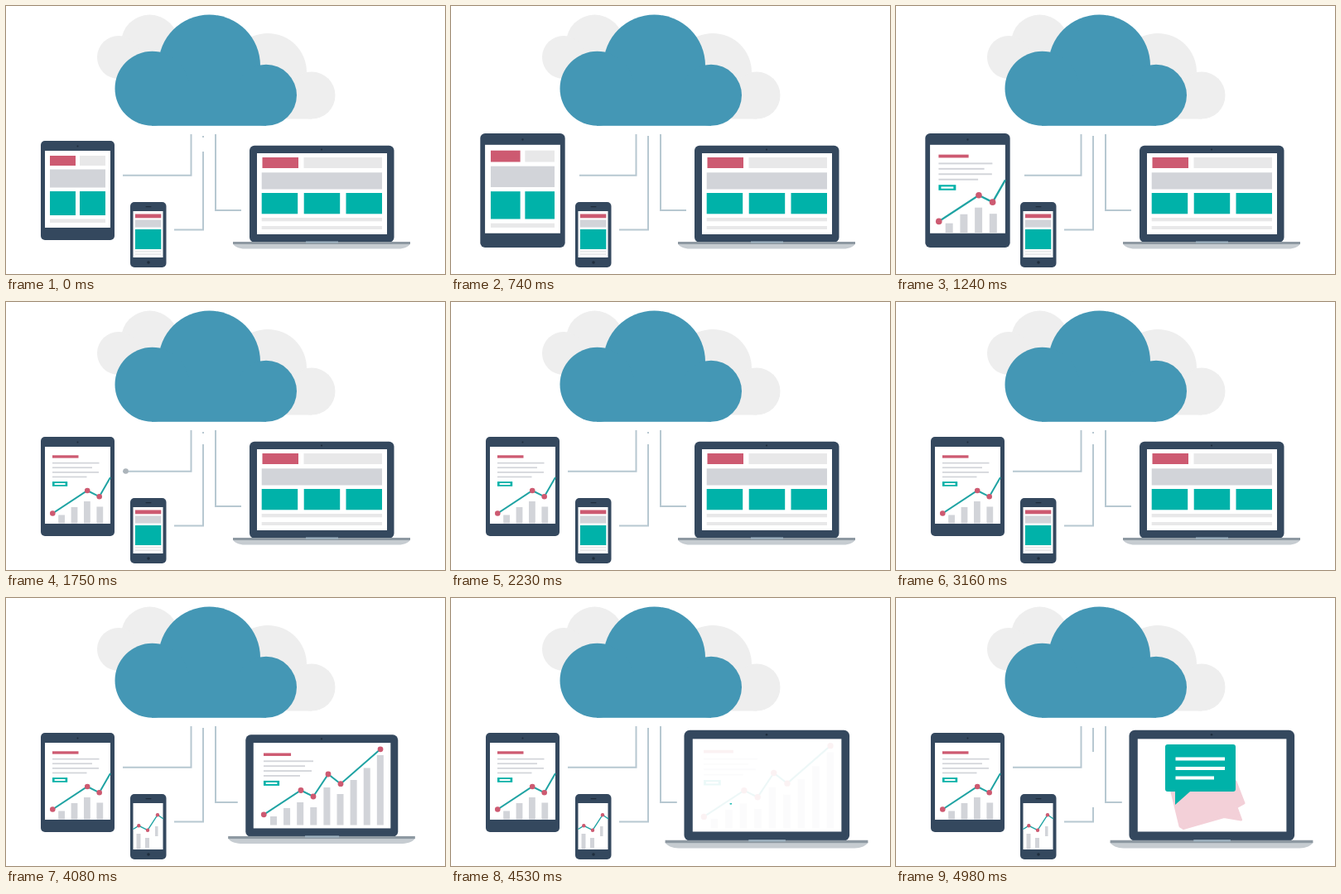
An HTML page for the animation above (5.01 s loop, 530 by 324 pixels).

```html
<!DOCTYPE html>
<html lang="en">
<head>
<meta charset="utf-8">
<title>Cloud sync</title>
<style>
html, body { margin: 0; width: 100%; height: 100%; overflow: hidden; background: #fff; }
svg { display: block; width: 530px; height: 324px; }
.body { fill: #34485e; }
.screen { fill: #fff; }
.red { fill: #cd5a71; }
.teal { fill: #00b2a9; }
.mid { fill: #d2d4d9; }
.pale { fill: #e8e8e9; }
.white { fill: #fff; }
.lens { fill: #1f2d3d; }
.curve { fill: none; stroke: #1fa3a3; stroke-width: 2.1; }
.wire { fill: none; stroke: #b7c8d1; stroke-width: 2; }
.pulse { fill: none; stroke: #acb4ba; stroke-width: 6.4; stroke-linecap: round; stroke-linejoin: round; }
</style>
</head>
<body>
<svg viewBox="0 0 530 324">
  <g id="wires">
    <path id="wireTablet" class="wire"/>
    <path id="wirePhone" class="wire" d="M238 157V270.5H203"/>
    <path id="wireLaptop" class="wire"/>
  </g>
  <path id="dotTablet" class="pulse" d="M144.5 204.5H223.5V156"/>
  <path id="dotPhone" class="pulse" d="M238 156V270.5H206"/>
  <path id="dotLaptop" class="pulse" d="M253 155V247H281"/>

  <g id="cloud">
    <g fill="#eee">
      <circle cx="173.500" cy="45" r="34.500"/>
      <circle cx="136" cy="62" r="26"/>
      <circle cx="316" cy="80" r="47"/>
      <circle cx="369" cy="108" r="28.500"/>
      <rect x="316" y="92" width="53" height="44.500"/>
    </g>
    <g fill="#4497b5">
      <circle cx="245.500" cy="72" r="61.500"/>
      <circle cx="176.500" cy="99.800" r="45"/>
      <circle cx="314" cy="107.800" r="37"/>
      <rect x="176" y="90" width="138" height="54.800"/>
    </g>
  </g>

  <g id="tablet">
    <rect class="body" x="42" y="163" width="89" height="120" rx="5"/>
    <rect class="screen" x="47" y="175" width="79" height="93"/>
    <circle class="lens" cx="86.500" cy="169.500" r="1"/>
    <g id="tabletWeb"></g>
    <g id="tabletChart"></g>
  </g>

  <g id="phone">
    <rect class="body" x="150" y="237" width="43.500" height="79" rx="5"/>
    <rect class="screen" x="153.500" y="248" width="36" height="56"/>
    <rect class="lens" x="168.500" y="242" width="7" height="1.200" rx=".6"/>
    <circle class="lens" cx="172" cy="310" r="1.800"/>
    <g id="phoneWeb"></g>
    <g id="phoneChart"></g>
  </g>

  <g id="laptop">
    <path d="M274 287H488C487 291 480 293.500 474 293.500H288C282 293.500 275 291 274 287Z" fill="#c6ccd1"/>
    <rect class="body" x="294" y="168.700" width="174.500" height="117" rx="6"/>
    <rect x="274" y="285" width="214" height="3" fill="#8e99a2"/>
    <rect x="362" y="284.500" width="39" height="2" fill="#9fb3c1"/>
    <rect class="screen" x="303" y="178" width="157" height="98"/>
    <circle class="lens" cx="381" cy="173.500" r="1.100"/>
    <g id="laptopWeb"></g>
    <g id="laptopChart"></g>
    <g id="chat">
      <path id="bubbleBack" fill="#f3d0d8" stroke="#f3d0d8" stroke-width="3" stroke-linejoin="round"
        d="M330 222L410 222L420 248L411 253L416.500 268L396 264.500L347 278.500L343 276Z"/>
      <g id="bubbleFront">
        <path class="teal" d="M328 177H407Q410 177 410 180V231Q410 234 407 234H355L337 250V234H328Q325 234 325 231V180Q325 177 328 177Z"/>
        <g class="white">
          <rect x="337.500" y="192.500" width="59.500" height="4"/>
          <rect x="337.500" y="204" width="59.500" height="4"/>
          <rect x="337.500" y="215.500" width="46.500" height="4"/>
        </g>
      </g>
    </g>
  </g>
</svg>
<script>
const LOOP = 5010;
const $ = id => document.getElementById(id);

// Shape helpers; boxes are given by their edges.
const box = (c, x1, y1, x2, y2) =>
  `<rect class="${c}" x="${x1}" y="${y1}" width="${x2 - x1}" height="${y2 - y1}"/>`;
const bars = (x, step, w, bottom, tops) =>
  tops.map((top, i) => box('mid', x + i * step, top, x + i * step + w, bottom)).join('');
const curve = (points, dots, r, width) =>
  `<polyline class="curve" style="stroke-width:${width}" points="${points.join(' ')}"/>` +
  dots.map(i => `<circle class="red" cx="${points[i][0]}" cy="${points[i][1]}" r="${r}"/>`).join('');
const article = (x, y, k, widths) =>
  box('red', x, y, x + 31.5 * k, y + 3.3 * k) +
  widths.map((w, i) => box('mid', x, y + (8.5 + 5.6 * i) * k, x + w, y + (10.2 + 5.6 * i) * k)).join('') +
  box('teal', x, y + 31.8 * k, x + 18.2 * k, y + 37.5 * k) +
  box('white', x + 2.6 * k, y + 33.7 * k, x + 15.6 * k, y + 35.7 * k);

$('tabletWeb').innerHTML =
  box('red', 53, 181, 84, 193) + box('pale', 89, 181, 120, 193) +
  box('mid', 53, 197.5, 120, 219.5) +
  box('teal', 53, 224, 84, 253) + box('teal', 89, 224, 120, 253) +
  box('pale', 53, 257.5, 120, 262);

$('tabletChart').innerHTML =
  article(56, 185.3, 1, [56.5, 48, 56, 41.5]) +
  bars(63.2, 15.4, 7.8, 267.5, [257.5, 248, 241, 247.5]) +
  curve([[56.3, 255.5], [98.2, 228], [112.7, 235.3], [126, 212]], [0, 1, 2], 3.3, 2);

$('phoneWeb').innerHTML =
  box('red', 156, 251.5, 187.3, 256.3) + box('mid', 156, 258.5, 187.3, 267.5) +
  box('teal', 156, 270, 187.3, 294) +
  box('pale', 156, 295.7, 187.3, 297.7) + box('pale', 156, 299.2, 187.3, 301);

$('phoneChart').innerHTML =
  box('mid', 157.5, 285, 162.5, 303.5) + box('mid', 168, 290, 173, 302) + box('mid', 180, 276, 183.5, 288) +
  curve([[153.5, 279.5], [160.3, 275.3], [171, 280.7], [183, 262.2], [190, 267]], [0, 1, 2, 3].slice(1), 2.2, 1.4);

$('laptopWeb').innerHTML =
  box('red', 309.5, 183, 353, 196) + box('pale', 359.5, 183, 454, 196) +
  box('mid', 308.7, 201.3, 454, 221.5) +
  [308.7, 359.7, 410.5].map(x => box('teal', x, 226, x + 43.5, 251.3)).join('') +
  box('pale', 308.7, 256, 454, 260.3) + box('pale', 308.7, 266, 454, 270);

$('laptopChart').innerHTML =
  article(311, 187.5, 1.05, [60, 50, 58, 44]) +
  bars(319, 16.1, 8, 274.5, [264, 254, 247, 253, 229, 237, 220, 205.5, 190]) +
  curve([[311.3, 261.8], [356, 232.5], [371, 240], [389, 213], [404, 224.7], [452, 182.8]], [0, 1, 2, 3, 4, 5], 3.4, 2);

// Timing helpers.
const clamp = u => Math.min(1, Math.max(0, u));
const ease = u => u < .5 ? 2 * u * u : 1 - 2 * (1 - u) * (1 - u);
const ramp = (t, a, b) => ease(clamp((t - a) / (b - a)));
function track(keys, t) {
  let v = keys[0][1];
  for (let i = 1; i < keys.length; i++)
    v += (keys[i][1] - keys[i - 1][1]) * ramp(t, keys[i - 1][0], keys[i][0]);
  return v;
}
function scale(id, s, x, y) {
  $(id).setAttribute('transform', `translate(${x} ${y}) scale(${s}) translate(${-x} ${-y})`);
}
const fade = (id, v) => { $(id).style.opacity = v; };

const tabletSize = [[500, 1], [740, 1.15], [1250, 1.15], [1340, 1.19], [1640, 1]];
const cloudSize = [[2230, 1], [2420, 1.15], [2630, 1]];
const laptopSize = [[3920, 1], [4320, 1.168], [4400, 1.144]];
// Broken stretch of the phone wire: start time, solid part, gap.
const gaps = [[0, 2, 17], [560, 0, 0], [1690, 2, 13], [2650, 20, 13], [2770, 2, 13], [3340, 0, 0], [4950, 29, 67]];
const dots = [['dotTablet', 1740, 2230], ['dotPhone', 2598, 3100], ['dotLaptop', 2615, 3115]]
  .map(([id, from, to]) => ({ el: $(id), from, to, len: $(id).getTotalLength() }));

scale('laptopChart', 1 / 1.054, 381, 231);
scale('chat', 1 / 1.144, 381, 231);

function draw(t) {
  const tab = track(tabletSize, t), lap = track(laptopSize, t);
  scale('tablet', tab, 86.5, 223);
  scale('cloud', track(cloudSize, t), 254, 78);
  scale('laptop', lap, 381, 231);

  $('wireTablet').setAttribute('d', `M223.5 155V204.800H${141 + (tab - 1) * 93}`);
  $('wireLaptop').setAttribute('d', `M253 155V247H${284 - (lap - 1) * 78}`);
  const gap = gaps.filter(g => t >= g[0]).pop();
  $('wirePhone').setAttribute('stroke-dasharray', gap[2] ? `${gap[1]} ${gap[2]} 400` : 'none');

  for (const d of dots) {
    const head = d.len * ramp(t, d.from, d.to);
    const tail = d.len * ramp(t - 60, d.from, d.to);
    d.el.style.display = t >= d.from && t < d.to ? '' : 'none';
    d.el.setAttribute('stroke-dasharray', `${Math.max(.1, Math.min(9, head - tail))} 999`);
    d.el.setAttribute('stroke-dashoffset', -Math.max(tail, head - 9));
  }

  const tabSwap = ramp(t, 740, 940), swap = ramp(t, 3180, 3370), clear = ramp(t, 4410, 4560);
  fade('tabletWeb', 1 - tabSwap);
  fade('tabletChart', tabSwap);
  fade('phoneWeb', 1 - swap);
  fade('phoneChart', swap);
  fade('laptopWeb', 1 - swap);
  fade('laptopChart', swap * (1 - clear));

  const front = ramp(t, 4500, 4760), back = ramp(t, 4700, 4970);
  scale('bubbleFront', front, 337, 250);
  scale('bubbleBack', .4 + .6 * back, 416, 268);
  fade('bubbleFront', front > 0 ? 1 : 0);
  fade('bubbleBack', back);
}

const start = performance.now();
function frame() {
  draw((performance.now() - start) % LOOP);
  requestAnimationFrame(frame);
}
draw(0);
requestAnimationFrame(frame);
</script>
</body>
</html>
```
